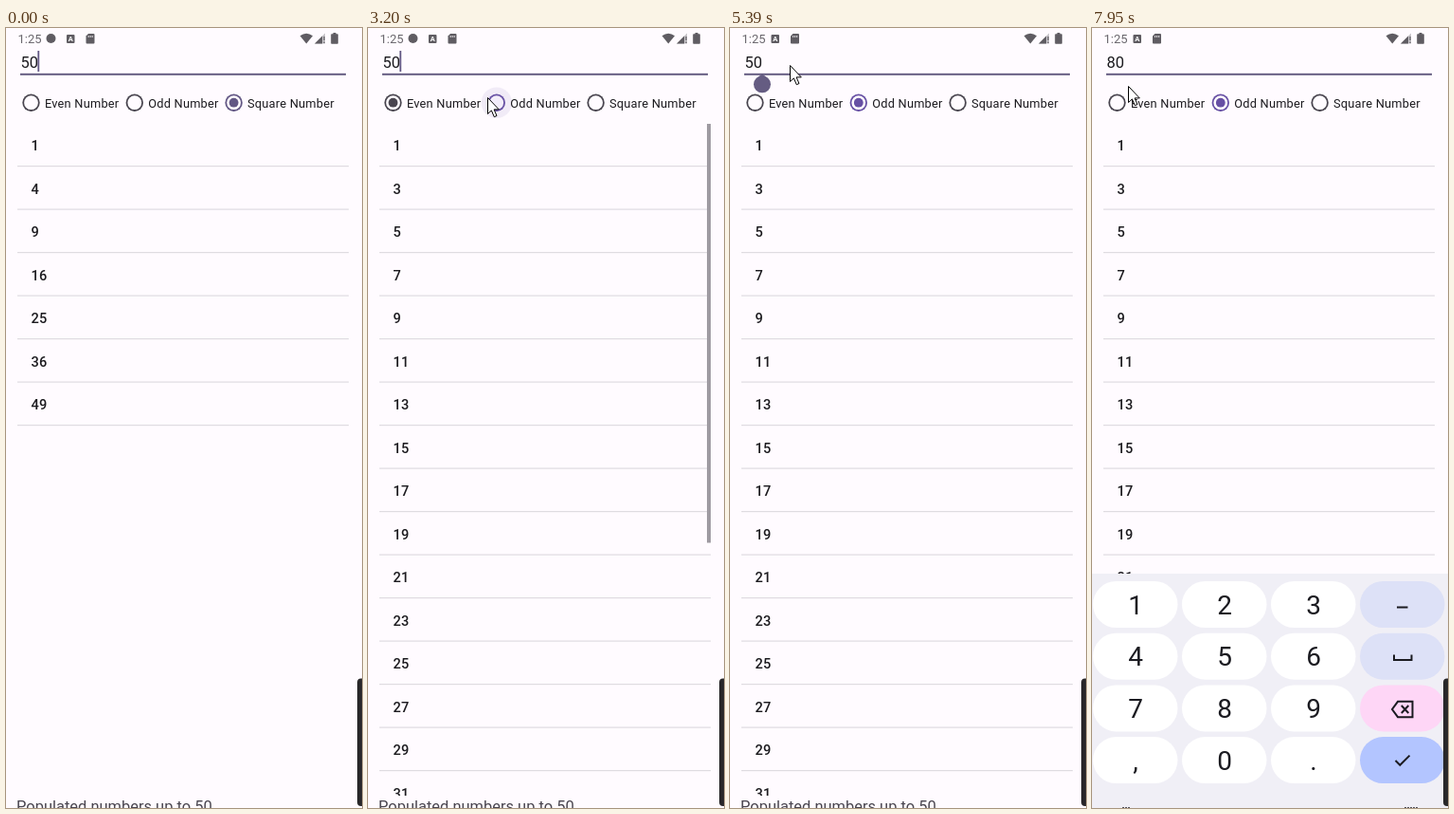
Recreate the animation shown at these times as an HTML page. Size 376x822 px, loop 8 s.

```html
<!DOCTYPE html>
<html lang="en">
<head>
<meta charset="utf-8">
<title>Number list</title>
<style>
html, body { margin: 0; width: 100%; height: 100%; overflow: hidden; background: #fffbff; }
svg { display: block; width: 376px; height: 822px; font-family: Roboto, sans-serif; }
.clock { font-size: 13px; fill: #6a676d; }
.input { font-size: 16.47px; fill: #1c1b1f; }
.footer { font-size: 16.47px; fill: #49454f; }
.label { font-size: 12.8px; letter-spacing: .23px; fill: #1c1b1f; }
.row { font-size: 14.6px; font-weight: 500; letter-spacing: .14px; fill: #1c1b1f; }
.key { font-size: 28px; fill: #1b1b21; text-anchor: middle; }
.icon { fill: none; stroke: #1b1b21; stroke-width: 2; }
</style>
</head>
<body>
<svg viewBox="0 0 376 822">
  <defs><clipPath id="listArea"><rect x="0" y="100" width="376" height="709"/></clipPath></defs>
  <rect width="376" height="822" fill="#fffbff"/>

  <text class="clock" x="12.5" y="15.5">1:25</text>
  <g fill="#5f5c62">
    <circle id="badge" cx="47.5" cy="11" r="5"/>
    <g id="notices">
      <rect x="64" y="7" width="8.5" height="9" rx="1"/>
      <text x="68.2" y="14.3" font-size="7.5" font-weight="700" text-anchor="middle" fill="#fff">A</text>
      <path d="M87 6h5.5q1 0 1 1v8.500q0 1-1 1h-7q-1 0-1-1v-7z"/>
      <path d="M87.200 8v2M89.200 8v2M91.200 8v2" stroke="#fffbff" stroke-width=".8"/>
    </g>
    <path d="M310.500 8.300Q317.200 3.200 324 8.300L317.200 16.500z"/>
    <path d="M326 16.500L337 5.500V16.500z" fill="#c5c2c7"/>
    <path d="M326 16.500L334 8.500V16.500z"/>
    <path d="M336 9v4M336 14.500v1.500" stroke="#5f5c62" stroke-width="1.200"/>
    <path d="M345.500 5h3v1.200h1.500q.8 0 .8.8v9q0 .8-.8.8h-6q-.8 0-.8-.8v-9q0-.8.8-.8h1.500z"/>
  </g>

  <text class="input" id="input" x="15.500" y="42"></text>
  <rect x="15" y="47.800" width="344" height="2" fill="#655c82"/>
  <rect id="caret" y="24" width="1.800" height="22" fill="#625784"/>

  <g id="radios"></g>
  <g id="list" clip-path="url(#listArea)"></g>
  <rect id="scrollbar" x="358" y="101" width="4" fill="#9f9ba2"/>
  <text class="footer" x="11" y="826">Populated numbers up to 50</text>
  <path id="handle" d="M34 48.500L40.400 53A9 9 0 1 1 27.600 53z" fill="#655c82"/>

  <g id="keyboard">
    <rect y="575" width="376" height="250" fill="#f0eff6"/>
    <g id="keys"></g>
    <path class="icon" d="M322 610.500h11.500M319 660.500v5.500h18.500v-5.500"/>
    <path class="icon" d="M323 709.800h15.500v16.400H323l-6-8.200zM326.800 714l7.500 8M334.300 714l-7.500 8"/>
    <path class="icon" d="M320.500 772l4.800 4.800 10.200-10.200"/>
    <path d="M32 821.500h9M330 821.500h15" stroke="#55545c" stroke-dasharray="2 1"/>
  </g>

  <rect x="371" y="685.500" width="12" height="134.500" rx="4" fill="#29282a"/>
  <circle id="press" r="15" fill="#ffff00" fill-opacity=".45"/>
  <path id="mouse" d="M.5.500V17.500L4.400 13.900 7.300 20.700 10 19.500 7.100 12.900H12.300z"
        fill="#fff" stroke="#000" stroke-linejoin="round"/>
</svg>

<script>
const LOOP = 8000;
const PRIMARY = '#6750a4', MUTED = '#49454f', RESTING = '#625784', PAPER = '#fffbff';
const $ = id => document.getElementById(id);
const clamp = v => Math.max(0, Math.min(1, v));
const ramp = (t, from, to) => clamp((t - from) / (to - from));
const mix = (a, b, p) => a + (b - a) * p;

function add(parent, tag, attrs, text = '') {
  const node = document.createElementNS('http://www.w3.org/2000/svg', tag);
  set(node, attrs);
  node.textContent = text;
  return parent.appendChild(node);
}
function set(node, attrs) {
  for (const name in attrs) node.setAttribute(name, attrs[name]);
}
const show = (node, on) => set(node, { visibility: on ? 'visible' : 'hidden' });

// Each choice has the moments it is pressed, selected and deselected.
const radios = [
  { label: 'Even Number', x: 26.5, on: 2020, off: 3200, ripple: 1860 },
  { label: 'Odd Number', x: 135.8, on: 3200, off: Infinity, ripple: 3090 },
  { label: 'Square Number', x: 240.6, on: -LOOP, off: 2020, ripple: Infinity }
].map(radio => {
  const circle = attrs => add($('radios'), 'circle', { cx: radio.x, cy: 78.7, ...attrs });
  const parts = {
    wave: circle({ fill: PRIMARY }),
    ring: circle({ r: 9.2 }),
    hole: circle({ fill: PAPER }),
    dot: circle({})
  };
  add($('radios'), 'text', { class: 'label', x: radio.x + 14.4, y: 83.5 }, radio.label);
  return { ...radio, ...parts };
});

const rows = Array.from({ length: 16 }, (_, i) => ({
  text: add($('list'), 'text', { class: 'row', x: 26.5, y: 129 + 45.5 * i }),
  line: add($('list'), 'rect', { x: 12, y: 145 + 45.5 * i, width: 350, height: 1.2, fill: '#dfdce1' })
}));

['123 ', '456 ', '789 ', ',0. '].forEach((line, r) => [...line].forEach((char, c) => {
  const y = 583 + 54.7 * r;
  const fill = c < 3 ? '#fff' : ['#dde1f7', '#dde1f7', '#fed6f6', '#b3c5ff'][r];
  add($('keys'), 'rect', { x: 1 + 94 * c, y, width: 89.5, height: 49, rx: 24.5, fill });
  add($('keys'), 'text', { class: 'key', x: 46 + 94 * c, y: y + 34.5 }, char);
}));

// Pointer path: time, x, y
const path = [
  [250, 280, 575], [320, 200, 277], [560, 200, 277], [580, 125, 130], [650, 97, 80],
  [890, 97, 80], [1260, 21, 83], [1870, 21, 83], [2200, 38, 83], [2480, 38, 83],
  [2640, 70, 67], [2840, 126, 73], [3600, 126, 73], [3820, 95, 57], [4360, 63, 39],
  [7700, 63, 39], [7950, 38, 61]
];
const presses = [[1460, 1660], [2840, 3060], [4360, 4560]];
const caretOn = [[0, 100], [580, 1120], [1660, 2190], [2710, 3250], [3780, 4300],
  [4760, 5390], [5850, 6530], [6990, 7740]];
const during = (spans, t) => spans.some(([from, to]) => t >= from && t < to);

function pointerAt(t) {
  const next = path.findIndex(point => point[0] > t);
  if (next < 0) return path.at(-1).slice(1);
  if (next === 0) return [-50, -50];
  const [t0, x0, y0] = path[next - 1], [t1, x1, y1] = path[next];
  const p = ramp(t, t0, t1);
  return [mix(x0, x1, p), mix(y0, y1, p)];
}

function drawRadio(radio, t) {
  const selected = t >= radio.on && t < radio.off;
  const p = ramp(t, selected ? radio.on : radio.off, (selected ? radio.on : radio.off) + 350);
  // The disc fills, then opens again around a dot or as an empty ring.
  let dot = 0, hole = 7.4;
  if (selected) {
    if (p < .4) hole = mix(7.4, 0, p / .4);
    else dot = mix(7.4, 4.9, ramp(p, .4, .8));
  } else if (t >= radio.off) {
    if (p < .4) dot = mix(4.9, 7.4, p / .4);
    else hole = mix(0, 7.4, ramp(p, .4, 1));
  }
  const touched = t >= radio.on - 140 && t < radio.off;
  const color = touched ? (radio.on < 0 ? RESTING : PRIMARY) : MUTED;
  const rippling = t >= radio.ripple && t < radio.ripple + 760;
  set(radio.wave, {
    r: rippling ? mix(11, 18.5, ramp(t, radio.ripple, radio.ripple + 160)) : 0,
    opacity: .12 * ramp(t, radio.ripple, radio.ripple + 150) * (1 - ramp(t, radio.ripple + 400, radio.ripple + 740))
  });
  set(radio.ring, { fill: color });
  set(radio.hole, { r: hole, fill: rippling && t < radio.ripple + 560 ? '#f3edfa' : PAPER });
  set(radio.dot, { r: dot, fill: color });
}

function drawList(t) {
  const kind = t < 2010 ? 'square' : t < 3130 ? 'even' : 'odd';
  const value = { square: i => (i + 1) ** 2, even: i => 2 * i, odd: i => 2 * i + 1 }[kind];
  rows.forEach((row, i) => {
    const visible = value(i) <= 50;
    row.text.textContent = visible ? value(i) : '';
    show(row.line, visible);
  });
  set($('scrollbar'), {
    height: kind === 'even' ? 424.5 : 441.5,
    opacity: kind === 'square' ? 0 : 1 - ramp(t, 4900, 5220)
  });
}

function draw(t) {
  const typed = t < 6000 ? '50' : t < 7190 ? '8' : '80';
  $('input').textContent = typed;
  set($('caret'), { x: 14.9 + 9.25 * typed.length });
  show($('caret'), during(caretOn, t));
  show($('handle'), t >= 4760 && t < 5920);

  show($('badge'), t < 5000);
  set($('notices'), { transform: `translate(${t < 5000 ? 0 : -20.5})` });

  radios.forEach(radio => drawRadio(radio, t));
  drawList(t);

  const rise = 1 - (1 - ramp(t, 5830, 6150)) ** 2;
  set($('keyboard'), { transform: `translate(0 ${250 * (1 - rise)})` });

  const place = { transform: `translate(${pointerAt(t).join(' ')})` };
  set($('mouse'), place);
  set($('press'), place);
  show($('press'), during(presses, t));
}

const start = performance.now();
function tick() {
  draw((performance.now() - start) % LOOP);
  requestAnimationFrame(tick);
}
tick();
</script>
</body>
</html>
```
